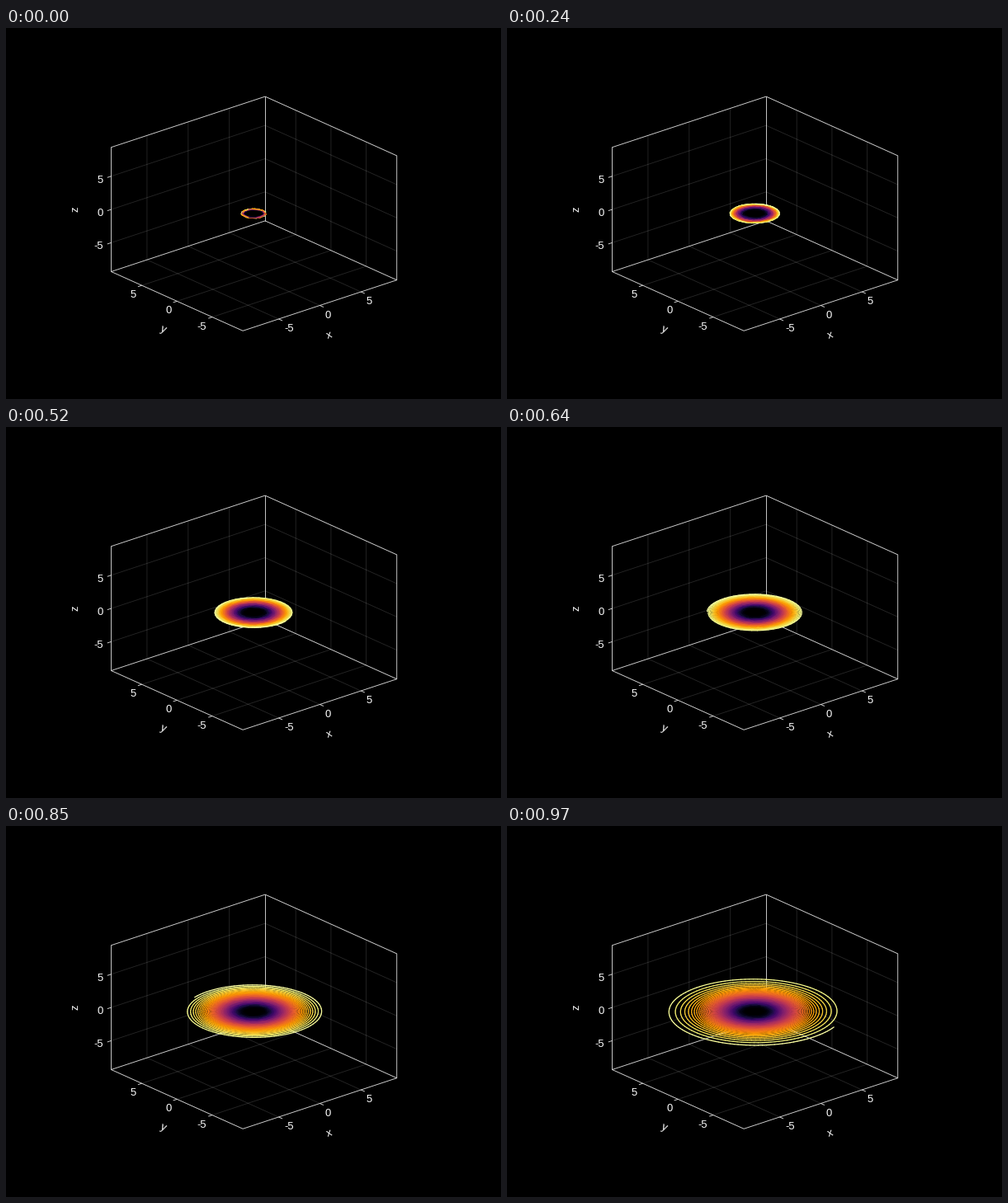
Write a matplotlib script that moves like this. It is 600 px wide and 450 px high and loops after 1 s.

```python
import numpy as np
import matplotlib.pyplot as plt
from matplotlib.animation import FuncAnimation
from matplotlib.collections import LineCollection

W, H, DPI = 600, 450, 100
PX = 72 / DPI         # one pixel in points
STEPS = 33            # poses per loop
TICKS = 100           # 10 ms ticks per loop
SAMPLES = 100         # orbit points per pose
LIMIT = 9.35

CENTER = np.array([300.6, 225.2])
EX = np.array([93.3, -30.8])     # screen vectors of half a box side
EY = np.array([-79.8, -35.9])
EZ = np.array([0.0, -75.4])
ORBIT_CENTER = (300.2, 225.0)
TILT = 0.386


def project(x, y, z):
    return CENTER + x * EX + y * EY + z * EZ


def orbit():
    """Low-thrust spiral, integrated backwards from its outer end."""
    growth = lambda r: 0.00624 * r**1.5 + 570 / r**2
    h = 1 / SAMPLES
    r, phi = 107.8, np.radians(-27)
    path = [(r, phi)]
    while r > 13.12:
        mid = r - growth(r) * h / 2
        r -= growth(mid) * h
        phi -= 5089 * mid**-1.5 * h
        path.append((r, phi))
    r, phi = np.array(path[::-1]).T
    return np.column_stack([ORBIT_CENTER[0] + r * np.cos(phi),
                            ORBIT_CENTER[1] - TILT * r * np.sin(phi)])


fig = plt.figure(figsize=(W / DPI, H / DPI), dpi=DPI, facecolor="black")
ax = fig.add_axes([0, 0, 1, 1])
ax.set(xlim=(0, W), ylim=(H, 0))
ax.axis("off")


def line(points, alpha=0.8, z=2):
    ax.plot(*np.array(points).T, color="white", alpha=alpha, lw=0.95 * PX,
            zorder=z, solid_capstyle="butt")


def label(x, y, text, **kw):
    style = dict(color="white", family="Liberation Sans", fontsize=13 * PX,
                 ha="center", va="baseline")
    ax.text(x, y, text, **{**style, **kw})


def toward(vec, length):
    return vec / np.hypot(*vec) * length


for v in (-5, 0, 5):
    f = v / LIMIT
    # faint grid on the floor and both back walls
    line([project(f, -1, -1), project(f, 1, -1), project(f, 1, 1)], 0.14, 1)
    line([project(-1, f, -1), project(1, f, -1), project(1, f, 1)], 0.14, 1)
    line([project(-1, 1, f), project(1, 1, f), project(1, -1, f)], 0.14, 1)

    px, py, pz = project(f, -1, -1), project(-1, f, -1), project(-1, 1, f)
    line([px, px + toward(-EY, 5)])
    line([py, py + toward(-EX, 5)])
    line([pz, pz + toward(-EX, 5)])
    label(px[0] + 6.5, px[1] + 15, str(v), ha="left")
    label(py[0] - 7, py[1] + 15, str(v), ha="right")
    label(118, pz[1] + 8, str(v), ha="right")

line([project(*p) for p in ((-1, -1, -1), (1, -1, -1), (1, 1, -1),
                            (-1, 1, -1), (-1, -1, -1))])
line([project(*p) for p in ((-1, 1, -1), (-1, 1, 1), (1, 1, 1),
                            (1, -1, 1), (1, -1, -1))])
line([project(1, 1, -1), project(1, 1, 1)])

label(392, 373, "x", va="center", rotation=18.4)
label(190.7, 366, "y", va="center", rotation=-24.3)
label(84.3, 219.3, "z", va="center", rotation=90)

path = orbit()
segments = np.stack([path[:-1], path[1:]], axis=1)
trail = LineCollection([], cmap="inferno", linewidths=1.25 * PX,
                       capstyle="round", zorder=3)
trail.set_clim(0, 1)
ax.add_collection(trail, autolim=False)


def update(tick):
    step = int((tick + 0.5) * STEPS / TICKS)
    count = len(segments) - SAMPLES * (STEPS - 1 - step)
    # coplanar turns overlap in no fixed depth order
    order = np.random.default_rng(step).permutation(count)
    trail.set_segments(segments[order])
    trail.set_array(np.linspace(0, 1, count)[order])
    return trail,


anim = FuncAnimation(fig, update, frames=TICKS, interval=10, repeat=True)
plt.show()
```
